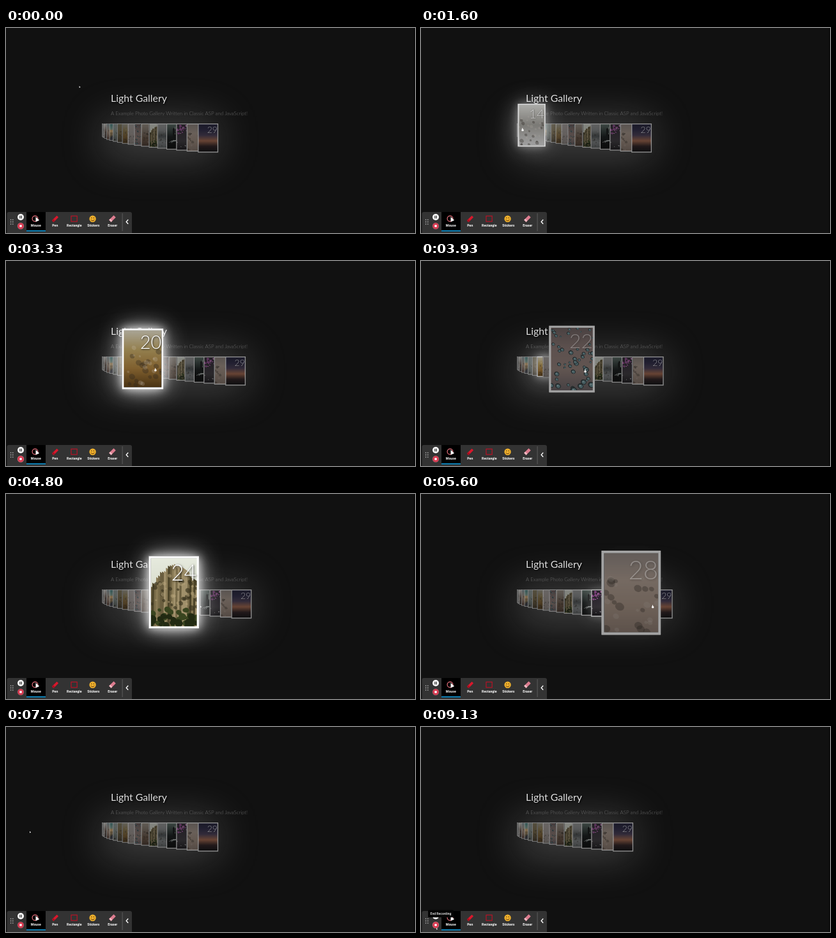
Animation of 640x322 px, one loop 9200 ms. Source, as an HTML page with a canvas:

```html
<!DOCTYPE html>
<html lang="en">
<head>
<meta charset="utf-8">
<title>Light Gallery</title>
<style>
html, body { margin: 0; width: 100%; height: 100%; overflow: hidden; background: #111; }
canvas { display: block; width: 640px; height: 322px; }
</style>
</head>
<body>
<canvas id="stage" width="640" height="322"></canvas>
<script>
const LOOP = 9200, STEPS = 138, STEP = LOOP / STEPS, FADE = 400;
const FIRST = 13, LAST = 29, TOP = 150;
const ctx = document.getElementById('stage').getContext('2d');

// Pointer turning points: [step, x, y]
const path = [[0, 115.5, 92.5], [10, 115.5, 92.5], [18, 152.6, 140], [21, 152.6, 158], [34, 180, 166],
  [40, 195.5, 167], [41, 204.5, 169], [42, 221, 170], [57, 245, 172], [59, 257, 173], [65, 274, 174],
  [72, 305, 177], [87, 377, 177], [90, 385, 176], [94, 302, 176], [96, 227, 175.5], [102, 185, 173],
  [103, 145, 170], [115, 38, 165], [120, 38, 165], [134, 25, 317], [STEPS, 25, 317]];

function pointer(step) {
  const i = Math.max(1, path.findIndex(p => p[0] >= step));
  const [s0, x0, y0] = path[i - 1], [s1, x1, y1] = path[i];
  const k = (step - s0) / (s1 - s0);
  return [x0 + (x1 - x0) * k, y0 + (y1 - y0) * k];
}

// A hovered card grows threefold and pushes those on its right
function cardBox(n, active) {
  const k = n - FIRST, w = 13.3 + 1.167 * k, h = 20.8 + 1.55 * k;
  const x = 150.2 + 0.7 * k + 0.542 * k * k;
  if (n === active) return { x, y: TOP - 1.385 * h, w: 3 * w, h: 3 * h };
  const push = active && n > active ? 2 * cardBox(active, 0).w : 0;
  return { x: x + push, y: TOP, w, h };
}

function hit(n, active, [px, py]) {
  const { x, y, w, h } = cardBox(n, active);
  return px >= x && px <= x + w && py >= y && py <= y + h;
}

function cardUnder(point, active) {
  if (active && hit(active, active, point)) return active;
  for (let n = LAST; n >= FIRST; n--) if (hit(n, active, point)) return n;
  return 0;
}

// The page answers the pointer one step late
const states = [{ active: 0, glow: {} }];
for (let s = 1; s < STEPS; s++) {
  const last = states[s - 1];
  const active = cardUnder(pointer(s - 1), last.active);
  const glow = {};
  for (let n = FIRST; n <= LAST; n++) {
    const change = STEP / FADE * (n === active ? 1 : -1);
    glow[n] = Math.max(0, Math.min(1, (last.glow[n] || 0) + change));
  }
  states.push({ active, glow });
}

function random(seed) {
  return () => (seed = seed * 16807 % 2147483647) / 2147483647;
}

// Pictures are painted once, in a space of 70 by 100 units
function brush(g, seed) {
  const rnd = random(seed * 977 + 5);
  const b = {
    rnd,
    sky(colors) {
      const fill = g.createLinearGradient(0, 0, 0, 100);
      colors.forEach((c, i) => fill.addColorStop(i / (colors.length - 1), c));
      g.fillStyle = fill;
      g.fillRect(0, 0, 70, 100);
    },
    blob(color, x, y, r) {
      g.fillStyle = color;
      g.beginPath();
      g.ellipse(x, y, r * 1.2, r, 0.4, 0, 7);
      g.fill();
    },
    spots(color, count, size, y0 = 0, y1 = 100) {
      for (let i = 0; i < count; i++) {
        b.blob(color, rnd() * 70, y0 + rnd() * (y1 - y0), size * (0.4 + 0.6 * rnd()));
      }
    },
    poly(color, ...points) {
      g.fillStyle = color;
      g.beginPath();
      for (const [x, y] of points) g.lineTo(x, y);
      g.fill();
    },
    curve(color, width, a, c, z) {
      g.strokeStyle = color;
      g.lineWidth = width;
      g.lineCap = 'round';
      g.beginPath();
      g.moveTo(...a);
      g.quadraticCurveTo(...c, ...z);
      g.stroke();
    }
  };
  return b;
}

const palettes = {
  13: '#777 #333', 14: '#c8c8c4 #8f8d88 #bbb', 15: '#d5d4ce #6c5a50 #332c2a', 16: '#8fa6ad #b39a86 #5e4238',
  17: '#4f8f90 #7da69a #d3c096 #6b5d44 #463b2c', 18: '#9aa9a6 #8b9690 #555c58', 19: '#8b8263 #7c6a45 #3d3524',
  20: '#a9a596 #94804f #80602f #493213', 21: '#b3adaa #a79d99 #8c837e', 22: '#6d5e5e #8b7773 #927e77 #665d60',
  23: '#a69c90 #857669 #6b5443 #4b392d', 24: '#e6eade #d8dccb #7c8060', 25: '#a3a5a5 #8f9293 #4d5354 #85898a #626768',
  26: '#5f726b #35433f #111717 #050808 #020303', 27: '#2c2530 #332c37 #3b373d #161418',
  28: '#958a84 #b3a093 #a79283 #8b786d', 29: '#1d1b38 #2a2747 #4a3d58 #b06c4e #2a1a1c #08070a'
};

const scenes = {
  17(b) {
    b.poly('#d9b27c', [0, 38], [16, 35], [30, 43], [70, 39], [70, 52], [0, 52]);
    b.poly('#9b8158', [0, 52], [42, 51], [0, 72]);
    b.poly('#3d3f45', [44, 51], [49, 51], [64, 100], [0, 100], [0, 88]);
    for (const x of [22, 28]) b.curve('#c9a24c', 0.9, [46, 52], [42, 70], [x, 100]);
  },
  22(b) {
    for (let i = 0; i < 55; i++) {
      const x = b.rnd() * 70, y = b.rnd() * 100, r = (1.2 + 2 * b.rnd()) * (0.8 + y / 130);
      b.blob('#2c3537', x, y, r);
      b.blob('#648a91', x + 0.3, y + 0.3, r * 0.7);
      b.blob('#b9d2d3', x - 0.6, y - 0.6, r * 0.2);
    }
  },
  24(b) {
    const tones = ['#a0906b', '#786b49', '#8a7b56', '#4c4429', '#6a5e3f'];
    for (let x = 0; x < 70; x += 3) {
      const top = 7 + 0.025 * (x - 36) ** 2 + 7 * b.rnd();
      b.poly(tones[Math.floor(b.rnd() * 5)], [x - 1, top], [x + 5, top + 4], [x + 6, 100], [x - 2, 100]);
    }
    b.spots('#3b351faa', 26, 4, 30, 75);
    b.spots('#b5a47a88', 20, 3, 22, 75);
    b.spots('#39451f', 26, 5, 74);
    b.spots('#222a12', 20, 6, 84);
  },
  26(b) {
    for (const x of [28, 40, 52]) b.curve('#0c1111', 8, [x, 20], [x - 4, 45], [36, 66]);
    b.curve('#a3aea8', 2, [33, 12], [36, 26], [34, 40]);
    for (let i = 0; i < 4; i++) {
      b.curve('#a9b0ae', 1.4, [36, 65 + i], [22, 64 + 2 * i], [9 + 5 * i, 74 + i]);
      b.curve('#c3c9c7', 1.8, [44, 65], [50 + 5 * i, 62], [48 + 5.5 * i, 82 - 3 * i]);
    }
  },
  27(b) {
    b.spots('#9b4f9a', 22, 5, 0, 40);
    b.spots('#dc98d2', 14, 3, 0, 38);
    b.spots('#8d8a8e', 8, 3, 60, 90);
  },
  29() {}
};

function speckle(b) {
  b.spots('#2a241f55', 16, 5, 35);
  b.spots('#d8cfc433', 12, 4, 20);
}

const pictures = {};
for (let n = FIRST; n <= LAST; n++) {
  const c = pictures[n] = document.createElement('canvas');
  c.width = 140;
  c.height = 200;
  const g = c.getContext('2d');
  g.scale(2, 2);
  const b = brush(g, n);
  b.sky(palettes[n].split(' '));
  (scenes[n] || speckle)(b);
}

function rect(color, x, y, w, h, r = 0) {
  ctx.fillStyle = color;
  ctx.beginPath();
  ctx.roundRect(x, y, w, h, r);
  ctx.fill();
}

function disc(color, x, y, r) {
  ctx.fillStyle = color;
  ctx.beginPath();
  ctx.arc(x, y, r, 0, 7);
  ctx.fill();
}

function arc(color, width, x, y, r, from, to) {
  ctx.strokeStyle = color;
  ctx.lineWidth = width;
  ctx.beginPath();
  ctx.arc(x, y, r, from, to);
  ctx.stroke();
}

function slanted(color, tip, x, y, w, h) {
  ctx.save();
  ctx.translate(x, y);
  ctx.rotate(-Math.PI / 4);
  rect(color, -w / 2, -h / 2, w, h, 0.8);
  rect(tip, -w / 2, -h / 2, w * 0.28, h, 0.8);
  ctx.restore();
}

function text(str, x, y, font, color, align = 'left') {
  ctx.font = font;
  ctx.fillStyle = color;
  ctx.textAlign = align;
  ctx.fillText(str, x, y);
}

function shadow(color, blur, dx = 0, dy = 0) {
  ctx.shadowColor = color;
  ctx.shadowBlur = blur;
  ctx.shadowOffsetX = dx;
  ctx.shadowOffsetY = dy;
}

function light(right) {
  ctx.save();
  shadow('rgba(200,200,200,.28)', 64, 2000);
  rect('#fff', 150 - 2000, 144, right - 150, 60);
  ctx.restore();
}

function halo({ x, y, w, h }, b) {
  if (!b) return;
  ctx.save();
  ctx.beginPath();
  ctx.rect(0, 0, 640, 322);
  ctx.rect(x, y, w, h);
  ctx.clip('evenodd');
  for (const blur of [36, 14]) {
    shadow(`rgba(255,255,255,${b * b * 0.8})`, blur);
    ctx.fillStyle = '#fff';
    ctx.fillRect(x, y, w, h);
  }
  ctx.restore();
}

function drawCard(n, { active, glow }) {
  const box = cardBox(n, active), { x, y, w, h } = box;
  const b = glow[n] || 0, edge = w * 0.042;
  halo(box, b);
  ctx.save();
  rect('#1a1a1a', x, y, w, h);
  ctx.globalAlpha = 0.52 + 0.48 * b;
  ctx.drawImage(pictures[n], x + edge, y + edge, w - 2 * edge, h - 2 * edge);
  ctx.strokeStyle = '#fff';
  ctx.lineWidth = edge;
  ctx.strokeRect(x + edge / 2, y + edge / 2, w - edge, h - edge);
  if (n === active || n === LAST) {
    if (n === active) ctx.globalAlpha *= 0.4 + 0.6 * b;
    shadow('rgba(0,0,0,.8)', h * 0.03, h * 0.008, h * 0.008);
    text(n, x + w - edge, y + h * 0.338, `300 ${h * 0.305}px Lato, sans-serif`, '#fff', 'right');
  }
  ctx.restore();
}

function drawGallery(state) {
  const end = cardBox(LAST, state.active);
  light(end.x + end.w);

  ctx.save();
  shadow('#000', 3, 1, 1);
  text('Light Gallery', 164, 115.5, '400 15.85px Lato, sans-serif', '#dedede');
  ctx.restore();
  text('A Example Photo Gallery Written in Classic ASP and JavaScript!', 164, 137.3,
    '300 7.87px Lato, sans-serif', '#6c6c6c');

  for (let n = FIRST; n <= LAST; n++) if (n !== state.active) drawCard(n, state);
  if (state.active) drawCard(state.active, state);
}

function drawArrow(x, y, size) {
  ctx.fillStyle = '#fff';
  ctx.beginPath();
  ctx.moveTo(x, y);
  ctx.lineTo(x, y + size);
  ctx.lineTo(x + size * 0.7, y + size * 0.7);
  ctx.fill();
}

function drawTools() {
  rect('#000', 32, 289, 30, 31);
  rect('#14a0e0', 32, 317.8, 30, 1.7);
  arc('#e8707c', 1.2, 45.5, 299.5, 4.4, 0, 7);
  drawArrow(46.5, 296.5, 8);

  slanted('#d8182c', '#a80f20', 77, 299.8, 11, 3.8);

  ctx.strokeStyle = '#b81226';
  ctx.lineWidth = 1.2;
  ctx.strokeRect(102, 295.3, 9.2, 8.6);

  disc('#eeb02c', 135.6, 299.8, 5.2);
  for (const x of [133.8, 137.4]) disc('#5a3512', x, 298.2, 0.8);
  arc('#6b3b12', 1, 135.6, 300, 2.8, 0.3, 2.8);

  slanted('#dd7c8f', '#efb9c2', 166.5, 299.5, 10.5, 4.8);

  ['Mouse', 'Pen', 'Rectangle', 'Stickers', 'Eraser'].forEach((label, i) =>
    text(label, 46.8 + 30 * i, 312.4, '700 5.2px Roboto, sans-serif', '#fff', 'center'));
}

function drawToolbar(step) {
  rect('#333', 1.5, 289, 195.5, 36, 3);
  for (const x of [7.6, 10.8]) for (const y of [301.2, 304.6, 308]) disc('#ccc', x, y, 0.8);

  disc('#fff', 23, 297, 5);
  for (const x of [21.2, 23.6]) rect('#333', x, 294.8, 1.3, 4.4);

  const pulse = 0.5 + 0.5 * Math.sin(step * 0.42);
  disc(`rgba(240,130,145,${0.5 + 0.4 * pulse})`, 23, 311, 5.2);
  disc('#d8344c', 23, 311, 4.5);
  rect('#fff', 21.3, 309.3, 3.4, 3.4);

  drawTools();

  rect('#666', 181.7, 291, 0.8, 28);
  ctx.strokeStyle = '#fff';
  ctx.lineWidth = 1.4;
  ctx.beginPath();
  ctx.moveTo(191.2, 301);
  ctx.lineTo(188.2, 304.4);
  ctx.lineTo(191.2, 307.8);
  ctx.stroke();

  if (step >= 134) {
    rect('#050505', 11, 287.5, 40, 11.5, 1.5);
    text('End Recording', 31, 295.2, '500 5.1px Roboto, sans-serif', '#eee', 'center');
  }
}

function drawPointer(step) {
  const [x, y] = pointer(step);
  const { active } = states[step];
  if (active && hit(active, active, [x, y])) {
    rect('#fff', x - 1.5, y - 0.8, 3.2, 3, 0.8);
    rect('#fff', x - 0.7, y - 2.8, 1.1, 3, 0.5);
  } else {
    drawArrow(x - 0.9, y - 1.4, 2.8);
  }
}

function frame(time) {
  const step = Math.floor((time % LOOP + 7) / STEP) % STEPS;
  rect('#111', 0, 0, 640, 322);
  drawGallery(states[step]);
  rect('#080808', 638.5, 0, 1.5, 322);
  drawToolbar(step);
  drawPointer(step);
}

const begin = performance.now();
function tick() {
  frame(performance.now() - begin);
  requestAnimationFrame(tick);
}
tick();
</script>
</body>
</html>
```
